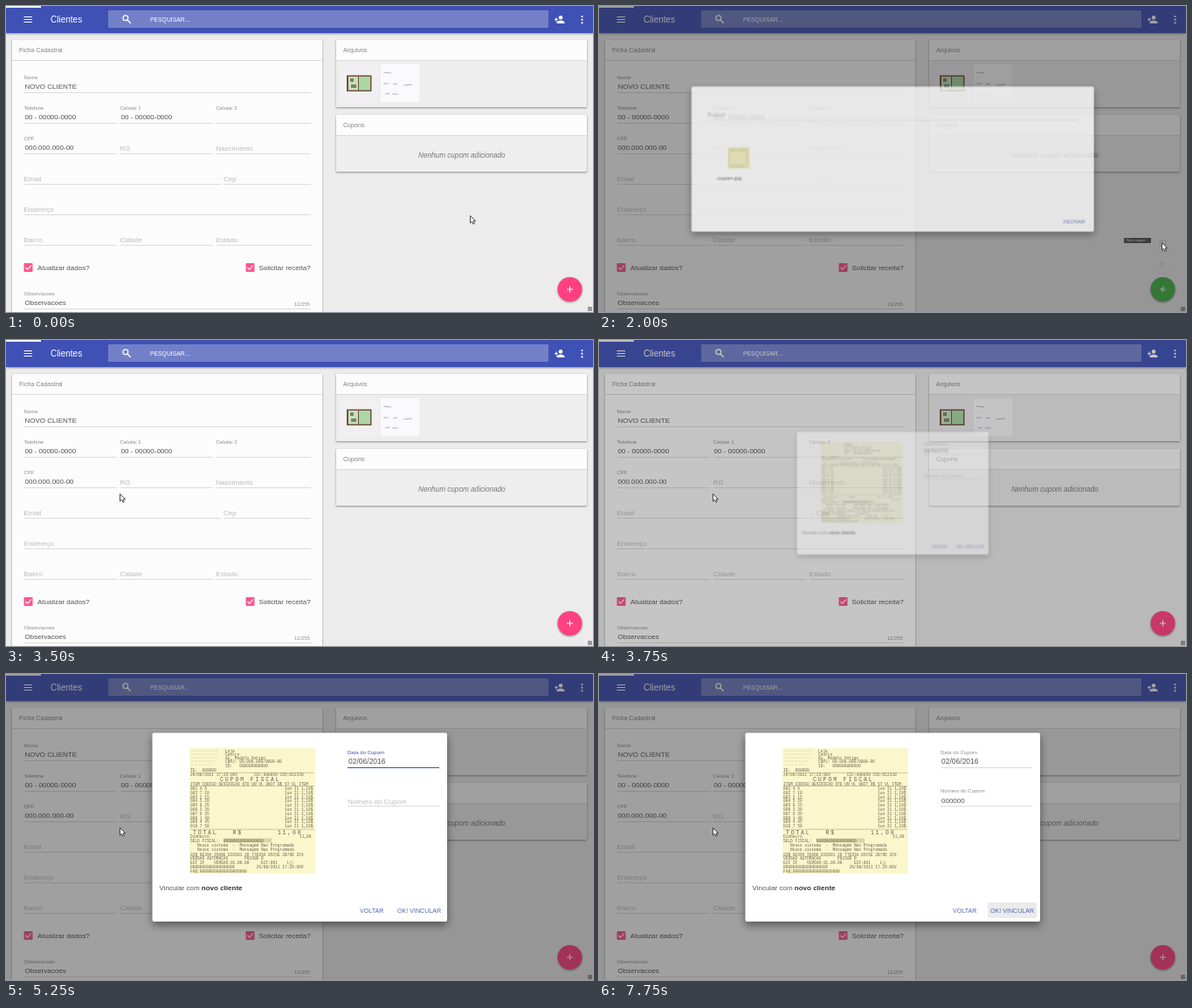
Recreate the animation shown at these times as an HTML page. Size 672 by 351 pixels, loop 8000 ms.

```html
<!DOCTYPE html>
<html lang="pt-BR">
<head>
<meta charset="utf-8">
<title>Clientes</title>
<style>
html, body { margin: 0; width: 100%; height: 100%; overflow: hidden; background: #ececec; }
svg { display: block; width: 672px; height: 351px; font-family: "Liberation Sans", Arial, sans-serif; }
text { white-space: pre; }
.value { font-size: 8px; fill: #555; }
.hint { font-size: 8px; fill: #bcbcbc; }
.label { font-size: 6px; fill: #8d8d8d; }
.title { font-size: 7.1px; fill: #858585; }
.action { font-size: 7.1px; fill: #5563b8; }
.rule { stroke: #dcdcdc; fill: none; }
.card { filter: drop-shadow(0 1px 1.2px #0006); }
.dialog { filter: drop-shadow(0 4px 5px #0007); }
.receipt { font: 4.5px "Liberation Mono", monospace; fill: #66644f; }

.anim { animation: 8s step-end infinite; }
.backdrop { animation-name: dim; }
.picker { animation-name: picker; transform-origin: 336px 175.5px; }
.linker { animation-name: linker; transform-origin: 336px 175.5px; }
.cursor { animation-name: move; }
.arrow { animation-name: arrow; }
.hand { animation-name: hand; }
.fab { animation-name: fab; }
.plus { animation-name: plus; transform-origin: 645.5px 325px; }
.dial { animation-name: dial; transform-origin: 645.5px 325px; }
.tip { animation-name: tip; }
.selected { animation-name: hand; }
.date-label { animation-name: date-label; }
.date-line { animation-name: date-line; }
.number-line { animation-name: number-line; }
.number-label { animation-name: number-label; }
.caret { animation-name: caret; }
.pair1 { animation-name: pair1; }
.pair2 { animation-name: pair2; }
.pair3 { animation-name: pair3; }
.back-focus { animation-name: back-focus; }
.ok-focus { animation-name: ok-focus; }

@keyframes dim {
  0% { opacity: 0 } 18.75% { opacity: .18 } 21.875% { opacity: .36 } 25% { opacity: .42 }
  43.75% { opacity: 0 } 46.875% { opacity: .25 } 50%, 100% { opacity: .42 }
}
@keyframes picker {
  0% { opacity: 0; transform: scale(.2) } 21.875% { opacity: .3; transform: scale(.55) }
  25% { opacity: .76; transform: scale(.854) } 28.125% { opacity: 1; transform: none }
  43.75%, 100% { opacity: 0; transform: none }
}
@keyframes linker {
  0% { opacity: 0; transform: scale(.2) } 46.875% { opacity: .4; transform: scale(.65) }
  50% { opacity: 1; transform: scale(.985) } 53.125%, 100% { opacity: 1; transform: none }
}
@keyframes move {
  0% { transform: translate(531px, 240px) } 3.125% { transform: translate(568px, 267px) }
  6.25% { transform: translate(625px, 310px) } 9.375% { transform: translate(644px, 321px) }
  12.5% { transform: translate(645px, 298px) } 15.625% { transform: translate(644px, 271px) }
  31.25% { transform: translate(590px, 258px) } 34.375% { transform: translate(350px, 215px) }
  37.5% { transform: translate(185px, 187px) } 40.625%, 100% { transform: translate(130px, 176px) }
}
@keyframes arrow { 0% { opacity: 1 } 40.625% { opacity: 0 } 43.75%, 100% { opacity: 1 } }
@keyframes hand { 0% { opacity: 0 } 40.625% { opacity: 1 } 43.75%, 100% { opacity: 0 } }
@keyframes fab { 0% { fill: #ff4081 } 9.375% { fill: #43b649 } 28.125%, 100% { fill: #ff4081 } }
@keyframes plus {
  0% { transform: none } 9.375% { transform: rotate(45deg) } 25% { transform: rotate(15deg) }
  28.125%, 100% { transform: none }
}
@keyframes dial {
  0% { opacity: 0; transform: scale(.4) } 9.375% { opacity: .6; transform: scale(.7) }
  12.5% { opacity: 1; transform: none } 21.875% { opacity: .6; transform: none }
  25% { opacity: .2; transform: none } 28.125%, 100% { opacity: 0; transform: none }
}
@keyframes tip { 0% { opacity: 0 } 15.625% { opacity: 1 } 28.125%, 100% { opacity: 0 } }
@keyframes date-label { 0% { fill: #8d8d8d } 65.625% { fill: #3f51b5 } 68.75%, 100% { fill: #8d8d8d } }
@keyframes date-line { 0% { stroke: #dcdcdc } 65.625% { stroke: #3f51b5 } 68.75%, 100% { stroke: #dcdcdc } }
@keyframes number-line { 0% { stroke: #dcdcdc } 68.75% { stroke: #3f51b5 } 90.625%, 100% { stroke: #dcdcdc } }
@keyframes number-label {
  0% { font-size: 8px; fill: #bcbcbc; transform: translate(391px, 148.5px) }
  68.75% { font-size: 6.4px; fill: #3f51b5; transform: translate(391px, 138px) }
  71.875% { font-size: 6px; fill: #3f51b5; transform: translate(391px, 135.5px) }
  90.625%, 100% { font-size: 6px; fill: #8d8d8d; transform: translate(391px, 135.5px) }
}
@keyframes caret {
  0% { opacity: 0; transform: none } 68.75% { opacity: 1; transform: none }
  78.125% { opacity: 1; transform: translateX(9px) } 81.25% { opacity: 1; transform: translateX(18px) }
  84.375% { opacity: 1; transform: translateX(26.7px) } 90.625%, 100% { opacity: 0 }
}
@keyframes pair1 { 0% { opacity: 0 } 78.125%, 100% { opacity: 1 } }
@keyframes pair2 { 0% { opacity: 0 } 81.25%, 100% { opacity: 1 } }
@keyframes pair3 { 0% { opacity: 0 } 84.375%, 100% { opacity: 1 } }
@keyframes back-focus { 0% { opacity: 0 } 90.625% { opacity: 1 } 93.75%, 100% { opacity: 0 } }
@keyframes ok-focus { 0% { opacity: 0 } 93.75%, 100% { opacity: 1 } }
</style>
</head>
<body>
<svg viewBox="0 0 672 351">
  <rect width="672" height="351" fill="#ececec"/>

  <!-- Customer form -->
  <rect class="card" x="7" y="39" width="355" height="330" rx="1" fill="#fcfcfc"/>
  <path class="rule" d="M7 62.5H362"/>
  <text class="title" x="15" y="53">Ficha Cadastral</text>
  <path class="rule" d="M21 99.5H349M21 134.5H127M131 134.5H237M241 134.5H349M21 169.5H127M131 169.5H237M241 169.5H349M21 204.5H246M249 204.5H349M21 239.5H349M21 274.5H127M131 274.5H237M241 274.5H349M21 347.5H349"/>
  <g class="label">
    <text x="20.500" y="83.500">Nome</text>
    <text x="20.500" y="118.500">Telefone</text>
    <text x="130.500" y="118.500">Celular 1</text>
    <text x="240.500" y="118.500">Celular 2</text>
    <text x="20.500" y="153.500">CPF</text>
    <text x="20.500" y="331.500">Observacoes</text>
    <text x="330" y="343.500">11/255</text>
  </g>
  <g class="value">
    <text x="21.500" y="95">NOVO CLIENTE</text>
    <text x="21.500" y="130">00 - 00000-0000</text>
    <text x="131.500" y="130">00 - 00000-0000</text>
    <text x="21.500" y="165">000.000.000-00</text>
    <text x="21.500" y="343">Observacoes</text>
    <text x="36" y="302.500">Atualizar dados?</text>
    <text x="289.500" y="302.500">Solicitar receita?</text>
  </g>
  <g class="hint">
    <text x="130.500" y="166">RG</text>
    <text x="240.500" y="166">Nascimento</text>
    <text x="20.500" y="201">Email</text>
    <text x="249" y="201">Cep</text>
    <text x="20.500" y="236">Endereço</text>
    <text x="20.500" y="271">Bairro</text>
    <text x="130.500" y="271">Cidade</text>
    <text x="240.500" y="271">Estado</text>
  </g>
  <g id="check">
    <rect x="20.500" y="295" width="10" height="10" rx="1" fill="#ff5590"/>
    <path d="M22.500 300l2.200 2.300 4-4.600" fill="none" stroke="#fff" stroke-width="1.100"/>
  </g>
  <use href="#check" x="254"/>

  <!-- Files and coupons -->
  <g class="card">
    <rect x="378" y="39" width="287" height="77" rx="1" fill="#eee"/>
    <rect x="378" y="39" width="287" height="23" fill="#fcfcfc"/>
  </g>
  <g class="card">
    <rect x="378" y="125" width="287" height="65" rx="1" fill="#eee"/>
    <rect x="378" y="125" width="287" height="23" fill="#fcfcfc"/>
  </g>
  <path class="rule" d="M378 62.500H665M378 148.500H665"/>
  <text class="title" x="386" y="53">Arquivos</text>
  <text class="title" x="386" y="139">Cupons</text>
  <rect x="383" y="67" width="43" height="43" fill="#f2eff2"/>
  <rect x="390" y="79.500" width="28.500" height="18.500" fill="#74503f"/>
  <rect x="392" y="81" width="11" height="15.500" fill="#c9dfbd"/>
  <rect x="404" y="81" width="13" height="15.500" fill="#a9d8a5"/>
  <path d="M394 83h4v4h-4zM395 90h6v4h-6z" fill="#6f8a69"/>
  <rect x="429" y="67" width="44" height="43" fill="#fafafc"/>
  <path d="M432 76l9 1M432 89h6m5 1l5-1m7 2l10-1M434 101l5-1m3 1h7" fill="none" stroke="#b5b0c6"/>
  <text x="472" y="174" font-size="8.200" font-style="italic" fill="#777">Nenhum cupom adicionado</text>

  <!-- Toolbar -->
  <rect class="card" width="672" height="31" fill="#3f51b5"/>
  <rect width="40" height="2" fill="#f4f4f4"/>
  <path d="M20.500 12.500h9.500m-9.500 3h9.500m-9.500 3h9.500" stroke="#fff" stroke-width="1.200"/>
  <text x="51" y="18.500" font-size="10" fill="#fff">Clientes</text>
  <rect x="117" y="5" width="504" height="20" rx="1" fill="#7380c8"/>
  <circle cx="136.800" cy="13.800" r="2.900" fill="none" stroke="#fff" stroke-width="1.200"/>
  <path d="M139 16l3.700 3.700" stroke="#fff" stroke-width="1.400"/>
  <text x="165" y="17.500" font-size="6.800" fill="#fff">PESQUISAR...</text>
  <g fill="#fff">
    <circle cx="635" cy="13.300" r="2.300"/>
    <path d="M630.500 20v-1.500q1.500-2 4.500-2t4.500 2V20zM628 15h1.300v-1.500h1.200V15h1.500v1.100h-1.500v1.600h-1.200v-1.600H628z"/>
    <circle cx="659.500" cy="12" r="1.100"/><circle cx="659.500" cy="15.700" r="1.100"/><circle cx="659.500" cy="19.400" r="1.100"/>
  </g>

  <!-- Speed dial -->
  <g class="anim dial">
    <g class="card" fill="#f5f5f5"><circle cx="645.500" cy="296.500" r="9.500"/><circle cx="645.500" cy="272" r="9.500"/></g>
    <path d="M643 293v7m4-7v7M642 269h7v6h-7z" fill="none" stroke="#444"/>
  </g>
  <g class="anim tip">
    <rect x="601" y="266" width="31" height="6" rx="1" fill="#555"/>
    <text x="604" y="270.300" font-size="3.800" fill="#fff">Novo cupom</text>
  </g>
  <g class="card"><circle class="anim fab" cx="645.500" cy="325" r="14"/></g>
  <path class="anim plus" d="M642 325h7m-3.500-3.500v7" stroke="#fff" stroke-width="1.100"/>
  <rect x="666" y="345" width="5" height="5" fill="#999"/>

  <rect class="anim backdrop" width="672" height="351" fill="#212121"/>

  <!-- File picker -->
  <g class="anim picker">
    <rect class="dialog" x="66.500" y="78" width="539.500" height="195" rx="2" fill="#fff"/>
    <text class="hint" x="88" y="118.500">Buscar</text>
    <path class="rule" d="M88 123.500H585" stroke-dasharray="1.500 1"/>
    <rect class="anim selected" x="92.500" y="134.500" width="76" height="79" fill="none" stroke="#3f4a9f" stroke-width="1.600"/>
    <rect x="115.500" y="159.500" width="29" height="29" fill="#f3eeb9"/>
    <path d="M117 162.500h9m3 0h13m-25 2h25M117 168v13m24-13v13M117 183.500h23m-23 2.500h20" stroke="#bdb88a" stroke-dasharray="2 1"/>
    <text class="value" x="101" y="203.500" style="font-size:7.100px">cupom.jpg</text>
    <text class="action" x="565" y="262.500">FECHAR</text>
  </g>

  <!-- Coupon linking -->
  <g class="anim linker">
    <rect class="dialog" x="167.500" y="67.500" width="337.500" height="216.500" rx="2" fill="#fff"/>
    <rect x="210" y="85" width="144" height="144" fill="#faf7cd"/>
    <path d="M212 88h32m-32 4h29m-29 4h32m-32 4h27m-27 4h24" stroke="#e2deb4" stroke-dasharray="3 1"/>
    <g class="receipt" id="receipt">
      <text x="251" y="89.500">Loja</text>
      <text x="251" y="93.500">Centro</text>
      <text x="251" y="98">Av. Modelo Antigo</text>
      <text x="251" y="102.300">CNPJ: 00.000.000/0000-00</text>
      <text x="251" y="107.300">ID:   000000000000</text>
      <text x="211" y="112.300">IE:  000000</text>
      <text x="211" y="117">26/08/2011 17:29:00V       CCF:000050 COO:012330</text>
      <text x="245" y="123" font-size="6.500" letter-spacing="1.900">CUPOM FISCAL</text>
      <text x="211" y="127.500">ITEM CODIGO DESCRICAO QTD UN VL UNIT R$ ST VL ITEM</text>
      <text x="214" y="183.500" font-size="6.500" letter-spacing="1.800">TOTAL   R$       11,00</text>
      <text x="211" y="187.700">Dinheiro</text>
      <text x="336" y="187.700">11,00</text>
      <rect x="249" y="188.500" width="55" height="5" fill="#d9d5a6"/>
      <text x="211" y="192.700">SELO FISCAL:  00000000000000000</text>
      <text x="219" y="198.300">Nosso sistema  -  Mensagem Nao Programada</text>
      <text x="219" y="203.300">Nosso sistema  -  Mensagem Nao Programada</text>
      <text x="211" y="208.700">02B 0E394 35A9E E91D01 2D 77E93A 05C5E 2B79D 2C4</text>
      <text x="211" y="213.300">VERSAO AUTOMACAO       P0150D R</text>
      <text x="211" y="218">ECF IF    VERSAO:01.00.00     ECF:001    Lj:</text>
      <text x="211" y="222.700">000000000000000000F         26/08/2011 17:29:00V</text>
      <text x="211" y="227.500">FAB:00000000000000000000</text>
      <path d="M211 113.300H353M211 128.500H353M211 178.200H353" stroke="#aaa681" stroke-width=".6"/>
    </g>
    <text class="value" x="175.500" y="248">Vincular com <tspan font-weight="bold" fill="#333">novo cliente</tspan></text>

    <text class="label anim date-label" x="391" y="91.500">Data do Cupom</text>
    <text class="value" x="392" y="103" style="font-size:8.500px">02/06/2016</text>
    <path class="rule anim date-line" d="M391 107.500H496"/>
    <text class="anim number-label">Número do Cupom</text>
    <g class="value">
      <text class="anim pair1" x="392" y="147.500">00</text>
      <text class="anim pair2" x="400.900" y="147.500">00</text>
      <text class="anim pair3" x="409.800" y="147.500">00</text>
    </g>
    <path class="anim caret" d="M392.500 140v9" stroke="#333" stroke-width=".8"/>
    <path class="rule anim number-line" d="M391 151.500H496"/>

    <rect class="anim back-focus" x="401" y="262" width="36" height="18" rx="1" fill="#ebebeb"/>
    <rect class="anim ok-focus" x="445" y="262" width="56" height="18" rx="1" fill="#ebebeb"/>
    <text class="action" x="405" y="273.500">VOLTAR</text>
    <text class="action" x="448" y="273.500">OK! VINCULAR</text>
  </g>

  <!-- Pointer -->
  <g class="anim cursor" stroke="#222" stroke-width=".8" fill="#fff">
    <path class="anim arrow" d="M.5.500v8.500l2-1.800 1.400 3 1.400-.7-1.300-2.800h2.500z"/>
    <path class="anim hand" d="M2.500 1.200q1-.8 1.500.3V5l3.500.8q.9.400.7 1.700L7.500 11h-4L.8 7.500q0-1.200 1.700-.2z"/>
  </g>
</svg>
<script>
const receipt = document.getElementById("receipt");

function addText(x, y, content) {
  const line = document.createElementNS(receipt.namespaceURI, "text");
  line.setAttribute("x", x);
  line.setAttribute("y", y);
  line.textContent = content;
  receipt.append(line);
}

for (let item = 1; item <= 10; item++) {
  const y = 133 + (item - 1) * 4.8;
  addText(211, y, `${String(item).padStart(3, "0")} ${(item * 3) % 8 + 1} ${item * 5}`);
  addText(319, y, "1un I1 1,10$");
}
</script>
</body>
</html>
```
